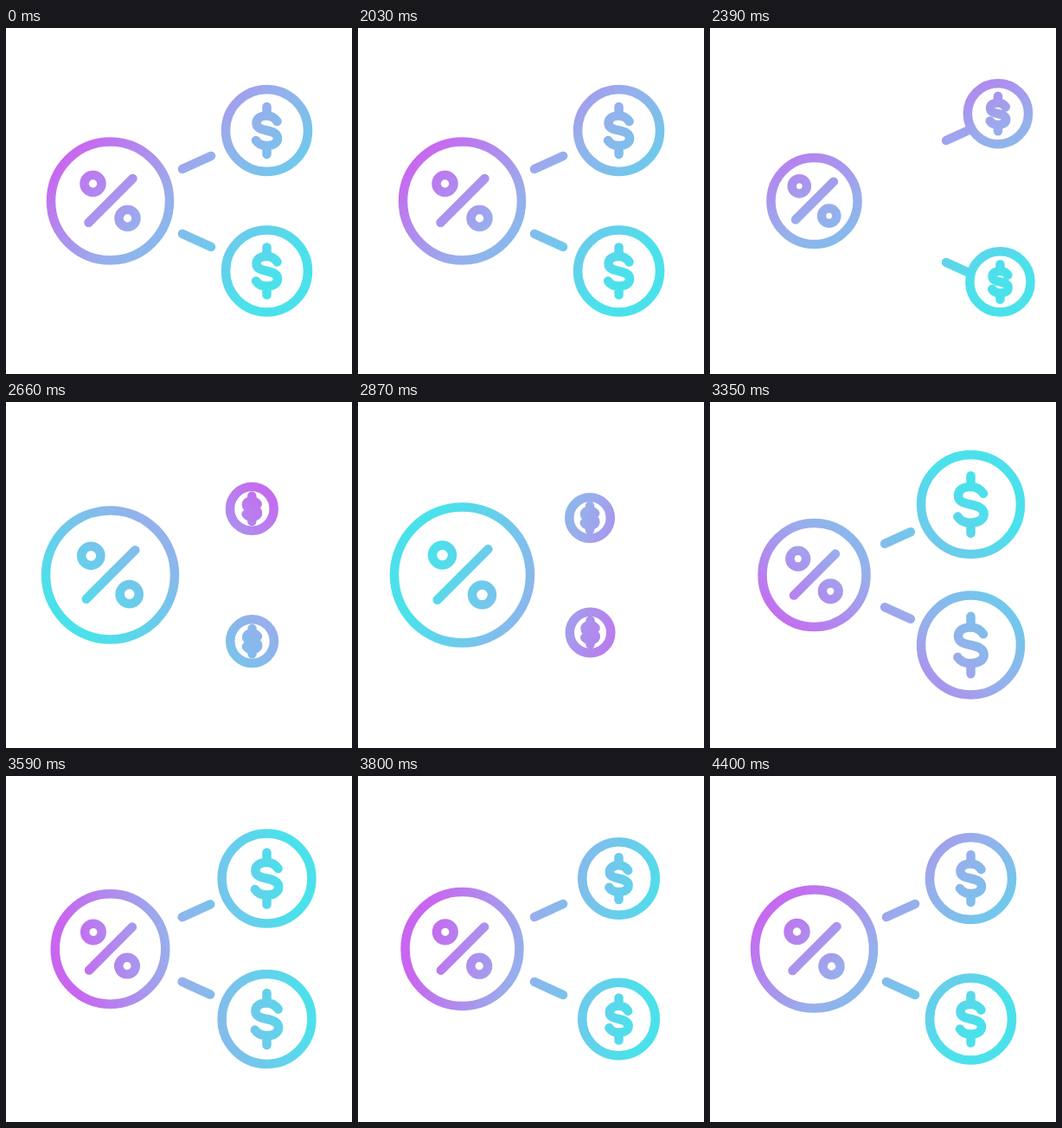
These frames come from a looping animation (400 px wide and 400 px high, 4460 ms). An HTML page without scripts:

```html
<!DOCTYPE html>
<html lang="en">
<head>
<meta charset="utf-8">
<title>Percentage payout</title>
<style>
  :root {
    --start: cubic-bezier(.4, 0, .75, .6);
    --through: cubic-bezier(.33, .33, .67, .67);
    --settle: cubic-bezier(.3, .5, .6, 1);
    --swing: cubic-bezier(.37, 0, .63, 1);
  }
  html, body { margin: 0; width: 100%; height: 100%; overflow: hidden; background: #fff; }
  svg { display: block; width: 100%; height: 100%; }

  circle, path {
    fill: none; stroke: #fff; stroke-width: 10.5;
    stroke-linecap: round; stroke-linejoin: round;
    vector-effect: non-scaling-stroke;
  }
  .cover { fill: #000; }

  .spin, .wheel, .percent, .pop, .up, .down, .dash { animation: 4460ms linear infinite; }
  .spin { animation-name: spin; transform-origin: 212px 200px; }
  .wheel { animation-name: wheel; }
  .percent { animation-name: percent; }
  .pop { animation-name: pop; }
  .up { animation-name: up; }
  .down { animation-name: down; }
  .dash { animation-name: dash; transform-origin: 220.5px 155.5px; }

  @keyframes spin {
    0%, 45.52% { transform: rotate(45deg); animation-timing-function: cubic-bezier(.33, 0, .67, .22); }
    53.59% { transform: rotate(65deg); animation-timing-function: cubic-bezier(.33, .15, .67, .66); }
    64.35% { transform: rotate(200deg); animation-timing-function: cubic-bezier(.33, .4, .67, .75); }
    75.11% { transform: rotate(310deg); animation-timing-function: cubic-bezier(.33, .45, .67, .75); }
    85.2% { transform: rotate(375deg); animation-timing-function: cubic-bezier(.33, .43, .67, 1); }
    93.95%, 100% { transform: rotate(405deg); }
  }
  @keyframes wheel {
    0%, 45.52% { transform: scale(1); animation-timing-function: var(--swing); }
    53.59% { transform: scale(.73); animation-timing-function: var(--swing); }
    64.35% { transform: scale(1.146); animation-timing-function: var(--settle); }
    66.37% { transform: scale(1.168); animation-timing-function: var(--start); }
    69.73% { transform: scale(1.117); animation-timing-function: var(--through); }
    75.11% { transform: scale(.876); animation-timing-function: var(--settle); }
    77.35% { transform: scale(.86); animation-timing-function: var(--swing); }
    85.2% { transform: scale(.963); animation-timing-function: var(--settle); }
    93.95%, 100% { transform: scale(1); }
  }
  @keyframes percent {
    0%, 45.52% { transform: scale(1); animation-timing-function: var(--swing); }
    53.59% { transform: scale(.86); animation-timing-function: var(--swing); }
    64.35% { transform: scale(1.15); animation-timing-function: var(--swing); }
    75.11% { transform: scale(.938); animation-timing-function: var(--swing); }
    85.2% { transform: scale(.985); animation-timing-function: var(--settle); }
    93.95%, 100% { transform: scale(1); }
  }
  @keyframes pop {
    0%, 45.52% { transform: scale(1); animation-timing-function: var(--start); }
    53.59% { transform: scale(.74); animation-timing-function: var(--through); }
    57.62% { transform: scale(.57); animation-timing-function: var(--settle); }
    64.35% { transform: scale(.5); animation-timing-function: var(--start); }
    69.73% { transform: scale(.83); animation-timing-function: var(--settle); }
    75.11% { transform: scale(1.21); animation-timing-function: var(--swing); }
    81.84% { transform: scale(1.09); animation-timing-function: var(--through); }
    85.2% { transform: scale(.89); animation-timing-function: var(--settle); }
    87.44% { transform: scale(.87); animation-timing-function: var(--swing); }
    98.65%, 100% { transform: scale(1); }
  }
  @keyframes up {
    0%, 45.52% { transform: translate(0, 0); animation-timing-function: var(--swing); }
    50.45% { transform: translate(45px, -23px); animation-timing-function: var(--start); }
    53.59% { transform: translate(31.5px, -19.5px); animation-timing-function: var(--through); }
    57.62% { transform: translate(.5px, -6.5px); animation-timing-function: var(--settle); }
    64.35% { transform: translate(-33.5px, 15.5px); animation-timing-function: var(--swing); }
    75.11%, 100% { transform: translate(0, 0); }
  }
  @keyframes down {
    0%, 45.52% { transform: translate(0, 0); animation-timing-function: var(--swing); }
    50.45% { transform: translate(46px, 13.5px); animation-timing-function: var(--start); }
    53.59% { transform: translate(34px, 12.5px); animation-timing-function: var(--through); }
    57.62% { transform: translate(.5px, 6.5px); animation-timing-function: var(--settle); }
    64.35% { transform: translate(-33px, -14.5px); animation-timing-function: var(--swing); }
    75.11%, 100% { transform: translate(0, 0); }
  }
  @keyframes dash {
    0%, 45.52% { transform: translate(0, 0); opacity: 1; animation-timing-function: var(--start); }
    53.59% { transform: translate(69px, -33px); opacity: 1; animation-timing-function: var(--through); }
    57.3% { transform: translate(86px, -41px); opacity: 1; animation-timing-function: step-end; }
    57.62% { transform: translate(60px, -27px); opacity: 0; animation-timing-function: step-end; }
    68.5% { transform: translate(40px, -18px) scale(.8); opacity: 1; animation-timing-function: var(--settle); }
    75.11% { transform: translate(-3.5px, 1.5px) scale(.9); opacity: 1; animation-timing-function: var(--swing); }
    85.2%, 100% { transform: translate(0, 0); opacity: 1; }
  }
</style>
</head>
<body>
<svg viewBox="0 0 400 400">
  <defs>
    <linearGradient id="tint" gradientUnits="userSpaceOnUse" x1="72" y1="0" x2="340" y2="0">
      <stop offset="0" stop-color="#c965f0"/>
      <stop offset=".44" stop-color="#98aeec"/>
      <stop offset="1" stop-color="#4be1eb"/>
    </linearGradient>
    <g id="coin">
      <circle class="cover" r="47.5"/>
      <path d="M12-10.5C9-15 5-17 0-17C-7-17-12-14-12-8.5C-12-3-7-1.5 0 0C7 1.5 12.5 3.5 12.5 9C12.5 14.5 7 17.5 0 17.5C-5 17.5-10 15.5-12.5 11.5M0-27.5V-17M0 17.5V27.5"/>
    </g>
    <path id="link" d="M204 163L237 148"/>
    <mask id="icon" maskUnits="userSpaceOnUse" x="0" y="0" width="400" height="400">
      <g class="dash"><use href="#link"/></g>
      <g transform="matrix(1 0 0 -1 0 401)"><g class="dash"><use href="#link"/></g></g>
      <g transform="translate(120.5 200)">
        <g class="wheel"><circle r="68.5"/></g>
        <g class="percent">
          <circle cx="-20" cy="-20" r="10"/>
          <circle cx="20" cy="20" r="10"/>
          <path d="M-25 25L26-26"/>
        </g>
      </g>
      <g transform="translate(301.5 118.5)"><g class="up"><g class="pop"><use href="#coin"/></g></g></g>
      <g transform="translate(301.5 281)"><g class="down"><g class="pop"><use href="#coin"/></g></g></g>
    </mask>
  </defs>
  <g mask="url(#icon)">
    <rect class="spin" x="-188" y="-200" width="800" height="800" fill="url(#tint)"/>
  </g>
</svg>
</body>
</html>
```
